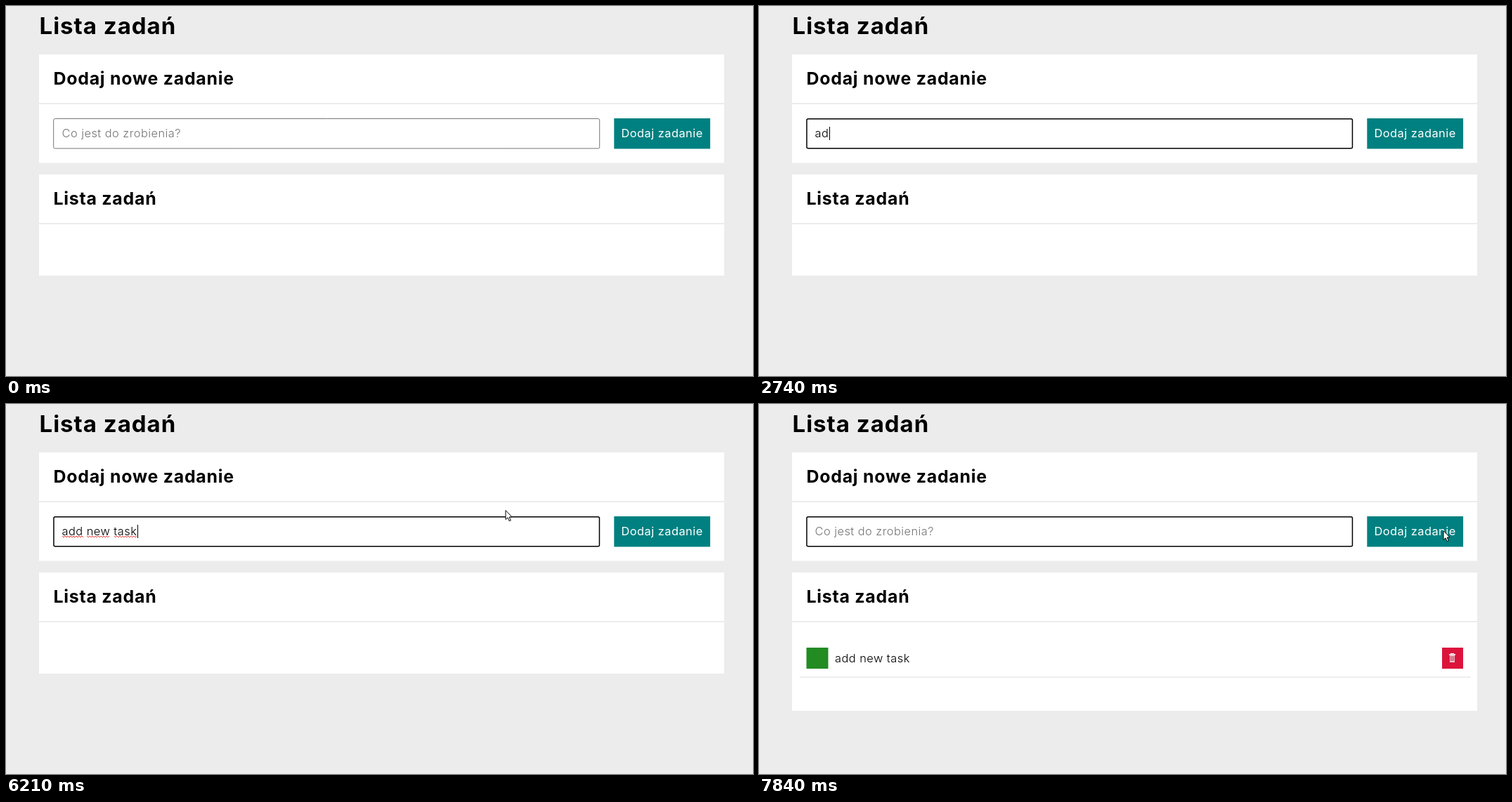
These frames come from a looping animation (1063x527 px, 8000 ms). An HTML page with a canvas:

```html
<!DOCTYPE html>
<html lang="pl">
<head>
<meta charset="utf-8">
<title>Lista zadań</title>
<style>
  html, body { margin: 0; width: 100%; height: 100%; overflow: hidden; background: #ececec; }
  canvas { display: block; }
</style>
</head>
<body>
<canvas id="stage" width="1063" height="527"></canvas>
<script>
const ctx = document.getElementById('stage').getContext('2d');
const LOOP = 8000, STEP = 70;
const FAMILY = 'Montserrat, Inter, "Open Sans", sans-serif';
const GREY = '#ececec';
const TASK = 'add new task';
const KEY_TIMES = [2500, 2740, 2910, 3090, 3380, 3490, 3690, 4040, 4490, 4610, 4880, 5150];
// Each word is marked as misspelt once it is finished.
const MARKS = [['', 'add', 3090], ['add ', 'new', 4040], ['add new ', 'task', 6210]];
const CARET_ON = [[1160, 1710], [2220, 5680], [6210, 6770], [7330, 7840]];
const PRESS = 7180, SUBMIT = 7330;

const within = (t, a, b) => t >= a && t < b;

function box(x, y, w, h, color) {
  ctx.fillStyle = color;
  ctx.fillRect(x, y, w, h);
}

function write(str, x, y, color, size, weight, spacing) {
  ctx.font = `${weight} ${size}px ${FAMILY}`;
  ctx.letterSpacing = spacing * size + 'px';
  ctx.fillStyle = color;
  ctx.fillText(str, x, y);
}

const title = (str, x, y, size) => write(str, x, y, '#000', size, 700, 0.03);
const label = (str, x, y, color, weight = 300) => write(str, x, y, color, 16.4, weight, 0.028);

function card(y, h, str) {
  box(47, y, 975, h, '#fff');
  box(47, y + 69, 975, 2, GREY);
  title(str, 67.5, y + 42.5, 24.9);
}

function squiggle(x, w) {
  ctx.beginPath();
  for (let i = 0; i <= w; i += 2) ctx.lineTo(x + i, i % 4 ? 190 : 188);
  ctx.strokeStyle = '#e0322c';
  ctx.lineWidth = 1;
  ctx.stroke();
}

function input(t) {
  const focused = within(t, 1160, PRESS) || t >= SUBMIT;
  const line = focused ? 1.5 : 1;
  ctx.beginPath();
  ctx.roundRect(67.2 + line / 2, 160 + line / 2, 778 - line, 43.4 - line, 2);
  ctx.strokeStyle = focused ? '#000' : '#767676';
  ctx.lineWidth = line;
  ctx.stroke();

  const typed = t < SUBMIT ? TASK.slice(0, KEY_TIMES.filter(k => k <= t).length) : '';
  label(typed || 'Co jest do zrobienia?', 79.5, 187, typed ? '#000' : '#757575');
  if (t < PRESS) {
    for (const [before, word, from] of MARKS) {
      if (t >= from) squiggle(80 + ctx.measureText(before).width, ctx.measureText(word).width);
    }
  }
  if (CARET_ON.some(([a, b]) => within(t, a, b))) {
    box(80 + Math.round(ctx.measureText(typed).width), 172, 1, 19, '#000');
  }
}

function button(t) {
  if (within(t, PRESS, SUBMIT)) box(863.8, 158.5, 140, 46.5, '#000');
  box(865.3, 160, 136.8, 43.4, '#008080');
  label('Dodaj zadanie', 875.5, 187, '#fff', 400);
}

function bin(x, y) {
  box(x + 2, y, 5, 1, '#fff');
  box(x, y + 1, 9, 2, '#f7d3da');
  box(x + 1, y + 3, 7, 10, '#f4c4cd');
  for (const dx of [2, 4, 6]) box(x + dx, y + 4, 1, 7, '#b4384f');
}

function taskRow() {
  box(67.5, 347, 31, 30, '#228b22');
  label(TASK, 108, 368, '#000');
  box(972, 347, 30, 30, '#dc143c');
  bin(982, 355);
  box(58, 388, 955, 2, '#eee');
}

function arrow(x, y) {
  const pts = [[0, 0], [0, 13], [3, 10.3], [5.2, 15.2], [7.3, 14.3], [5.2, 9.6], [9, 9.3]];
  ctx.beginPath();
  for (const [dx, dy] of pts) ctx.lineTo(x + dx, y + dy + 0.5);
  ctx.closePath();
  ctx.fillStyle = '#fff';
  ctx.fill();
  ctx.strokeStyle = '#000';
  ctx.lineWidth = 1;
  ctx.stroke();
}

function bezier(a, b, c, d, u) {
  const v = 1 - u;
  return v * v * v * a + 3 * v * v * u * b + 3 * v * u * u * c + u * u * u * d;
}

// The pointer is sampled in steps; it is not visible over the text field.
function pointer(t) {
  const stepped = (from, to) => Math.min(1, Math.floor((t - from) / STEP) * STEP / (to - from));
  if (within(t, 130, 830)) {
    const v = 1 - stepped(130, 830);
    return [544 + 396 * v ** 3, 210 + 310 * v ** 2];
  }
  if (t >= 6210) {
    const u = stepped(6210, 6770);
    return [bezier(711, 900, 1112, 974, u), bezier(151, 103, 140, 180, u)];
  }
  return null;
}

function draw(t) {
  box(0, 0, 1063, 527, GREY);
  title('Lista zadań', 47.5, 40, 33);
  card(69, 154.5, 'Dodaj nowe zadanie');
  card(240, t >= SUBMIT ? 197 : 144, 'Lista zadań');
  input(t);
  button(t);
  if (t >= SUBMIT) taskRow();

  const p = pointer(t);
  if (p) arrow(Math.round(p[0]), Math.round(p[1]));
  if (within(t, PRESS, SUBMIT)) {
    ctx.beginPath();
    ctx.arc(974, 180, 12.5, 0, Math.PI * 2);
    ctx.fillStyle = 'rgba(255, 255, 0, 0.52)';
    ctx.fill();
  }
}

const start = performance.now();
function tick() {
  draw((performance.now() - start) % LOOP);
  requestAnimationFrame(tick);
}
tick();
</script>
</body>
</html>
```
